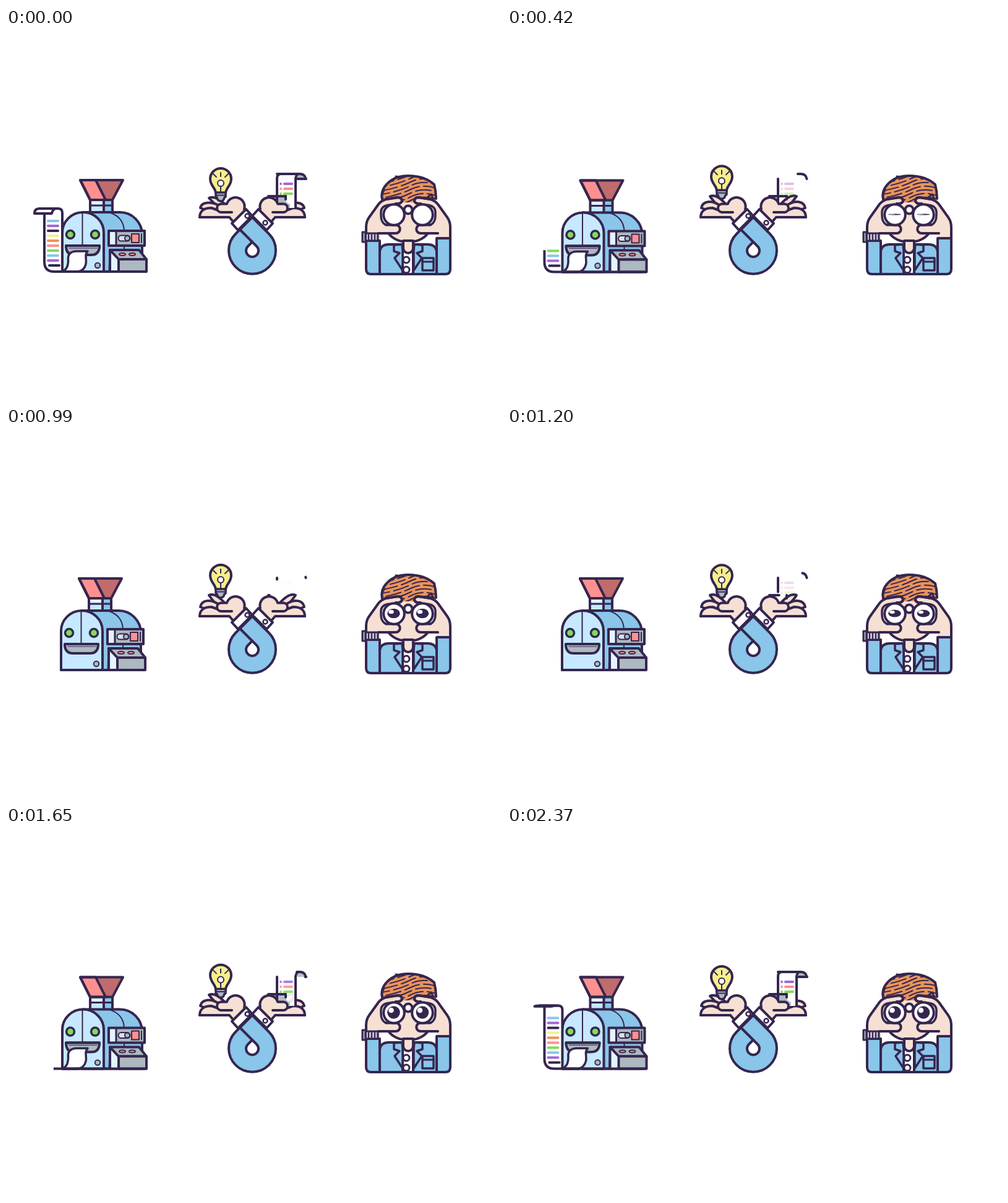
These frames come from a looping animation (800 px wide and 600 px high, 2400 ms). An HTML page with a canvas:

```html
<!DOCTYPE html>
<html lang="en">
<head>
<meta charset="utf-8">
<title>Three icons</title>
<style>
html, body { margin: 0; width: 800px; height: 600px; overflow: hidden; background: #fff; }
canvas { display: block; }
</style>
</head>
<body>
<canvas id="stage" width="800" height="600"></canvas>
<script>
const ctx = document.getElementById('stage').getContext('2d');
const LOOP = 2400;
const INK = '#35264f', WHITE = '#fff', PALE = '#c6e9ff', ICE = '#e3f4ff', BLUE = '#8ac5ea',
  SKIN = '#f6e0d3', PINK = '#ff9090', RED = '#c06c6c', YELLOW = '#f7ef8c', GREY = '#adb9c1',
  GREEN = '#7fdc5a', PURPLE = '#a566d8', ORANGE = '#e8935c';

// Linear value at time t through [time, value] points
function track(t, points) {
  for (let i = 1; i < points.length; i++) {
    const [t0, a] = points[i - 1], [t1, b] = points[i];
    if (t <= t1) return a + (b - a) * Math.max(0, (t - t0) / (t1 - t0));
  }
  return points[points.length - 1][1];
}

function shape(d, fill, width = 4, color = INK) {
  const path = new Path2D(d);
  if (fill) { ctx.fillStyle = fill; ctx.fill(path); }
  if (width) { ctx.strokeStyle = color; ctx.lineWidth = width; ctx.stroke(path); }
}
const line = (d, width = 4, color = INK) => shape(d, null, width, color);

function oval(x, y, rx, ry, fill, width = 0) {
  ctx.beginPath();
  ctx.ellipse(x, y, rx, ry, 0, 0, Math.PI * 2);
  ctx.fillStyle = fill;
  ctx.fill();
  if (width) { ctx.strokeStyle = INK; ctx.lineWidth = width; ctx.stroke(); }
}
const disc = (x, y, r, fill, width) => oval(x, y, r, r, fill, width);

function scoped(draw) { ctx.save(); draw(); ctx.restore(); }

function clipped(x, y, w, h, draw) {
  scoped(() => { ctx.beginPath(); ctx.rect(x, y, w, h); ctx.clip(); draw(); });
}

// Draws once as is and once reflected; the axis is at sum / 2
function mirrored(sum, draw) {
  draw();
  scoped(() => { ctx.translate(sum, 0); ctx.scale(-1, 1); draw(); });
}

// ---- Printing machine ----
function machineBody() {
  shape('M136 278H172V300H136Z', BLUE, 0);
  shape('M136 278H157V300H136Z', ICE, 0);
  shape('M138 288H157V298H138Z', PALE, 0);
  line('M136 278V298M172 278V298M158 278V298');
  line('M136 287H172', 3);
  shape('M120 246H189L172 278H136Z', RED, 0);
  shape('M120 246H145L161 278H136Z', PINK);
  line('M120 246H189L172 278H136Z');

  shape('M124 298H184A36 36 0 0 1 220 334V394H124Z', BLUE);
  line('M166 298Q190 305 191 328V360', 2);
  shape('M91 394V331A33.5 33 0 0 1 158 331V394Z', PALE);
  line('M123.5 299V352', 2);
  disc(104, 334, 6.5, GREEN, 3.5);
  disc(144, 334, 6.5, GREEN, 3.5);
  disc(148, 384, 4.2, GREY, 2);

  shape('M166 328H224V352H166Z', GREY, 0);
  shape('M166 328H178V352H166Z', ICE, 3);
  line('M166 328H224V352H166Z');
  shape('M186 335.5H196A4.5 4.5 0 0 1 196 344.5H186A4.5 4.5 0 0 1 186 335.5Z', '#d9e2e8', 2);
  disc(196, 340, 4, GREY, 2);
  shape('M203 333H215V347H203Z', PINK, 2);
  line('M219 333V347', 2);

  shape('M168 359L182 374V394H167Z', ICE, 3);
  shape('M168 359H215L227 374H182Z', GREY);
  shape('M182 374H227V394H182Z', GREY);
  line('M168 359V394');
  oval(188, 366, 5, 2, PINK, 2);
  oval(204, 366, 5, 2, PINK, 2);
}

function mouthAndTongue(length) {
  shape('M97 352H151V354Q150 367 138 367H110Q98 367 97 354Z', GREY);
  line('M102 356H147', 1);
  if (length <= 0) return;
  clipped(85, 350, 75, length + 2, () => {
    shape('M132 361C126 367 131 374 129 382Q126 393 116 394H91Q99 390 100 382C102 375 98 370 103 365Q107 361 114 361Z', WHITE, 3.5);
  });
  line('M97 352H151');
}

const RULES = [BLUE, PURPLE, INK, YELLOW, ORANGE, PINK, GREEN, BLUE, PURPLE, INK];

function paperStrip(length) {
  if (length <= 45) return;
  scoped(() => {
    ctx.lineCap = 'butt';
    ctx.setLineDash([length - 19, 999]);
    line('M118 394H78Q62 394 62 378V292');
  });
  if (length <= 84) return;
  const top = 462 - length;
  clipped(40, top - 3, 60, 110, () => line('M82 292H84Q91 292 91 299V328'));
  RULES.forEach((color, i) => {
    const y = 312 + i * 8;
    if (y > top) line(i === 9 ? `M70 ${y}H86` : `M68 ${y}H84`, 4, color);
  });
  const curl = Math.min(1, (length - 170) / 12);
  if (curl <= 0) return;
  line('M54 292H84');
  const low = 292 + 8 * curl;
  shape(`M80 292Q75 ${292 + 2 * curl} 74 ${low}H46Q46 292 54 292Z`, WHITE);
}

function machine(t) {
  const length = track(t, [[0, 182], [420, 104], [900, 0], [1230, 0], [1380, 23],
    [1650, 60], [2010, 124], [2370, 172], [2400, 182]]);
  const dx = track(t, [[0, 0], [420, -1.5], [990, -2], [1380, -2], [1650, 0], [2010, -2], [2370, -1.5], [2400, 0]]);
  const dy = track(t, [[0, 0], [420, 0.5], [990, -1], [1380, -0.8], [1650, -1.4], [2010, -1], [2370, -1.6], [2400, 0]]);
  scoped(() => {
    ctx.translate(dx, dy);
    machineBody();
    mouthAndTongue(length);
    paperStrip(length);
    line('M91 394H226');
  });
}

// ---- Balancing hands ----
function fingers(lift) {
  const y = 3 * (1 - lift);
  shape(`M328 ${272 + y}C336 ${268 + y} 345 ${275 + y / 2} 354 285L345 290Q336 284 328 ${272 + y}Z`, SKIN);
  shape(`M314 291C316 ${280 + y / 2} 330 ${277 + y} 344 287L346 297H330Z`, SKIN);
  shape('M313 306C313 296 320 291 332 291L346 296L365 306Z', SKIN);
}

function palm() {
  shape('M345 296L348 284H357A14 14 0 0 1 385 293L367 313L361 306H330Z', SKIN, 0);
  shape('M365 298H347A6.8 6.8 0 0 1 347 284.5H357A14 14 0 0 1 385 293', SKIN);
  line('M313 306H361L367 313');
}

function bulb(dy) {
  scoped(() => {
    ctx.translate(0, dy);
    shape('M339 267C339 259 330 255 330 244A17 17 0 1 1 364 244C364 255 355 259 355 267Z', YELLOW);
    shape('M339 266H355V272Q355 274 353 274Q352 280 347 280Q342 280 341 274Q339 274 339 272Z', GREY, 3.5);
    line('M340 270.5H354', 2);
    line('M347 255V265M347 234V240M335 236L340 241M359 236L354 241', 2);
    disc(347, 251, 5, WHITE, 2);
  });
}

// age: 0 for a whole sheet, 900 for a vanished one
function listSheet(age) {
  const fade = track(age, [[0, 1], [150, 0.85], [420, 0.4], [810, 0.03], [900, 0]]);
  const solid = track(age, [[0, 1], [150, 0.9], [420, 0], [900, 0]]);
  const cut = track(age, [[0, 0], [150, 1]]);
  const shrink = track(age, [[420, 1], [810, 0.06], [900, 0]]);
  const side = track(age, [[150, 1], [420, 0]]);
  const fold = track(age, [[0, 1], [150, 0.1], [300, 0]]);
  scoped(() => {
    ctx.globalAlpha = solid;
    shape('M438 243Q438 236 445 236H472Q468 238 468 245V291H438Z', WHITE, 0);
    shape('M470 236H478Q485 237 485 244H471Z', GREY, 0);
    shape('M424 272H452V278Q454 284 459 285V290H424Z', GREY, 0);
    ctx.globalAlpha = fade;
    [PURPLE, PINK, GREEN].forEach((color, i) => {
      const y = 252 + i * 8;
      disc(444, y, 2, color);
      line(`M450 ${y}H462`, 4, color);
    });
  });
  if (cut < 1) line(`M${438 + 28 * cut} 236H470M438 243Q438 ${236 + 6 * cut} ${445 - 7 * cut} ${236 + 6 * cut}`);
  if (fold > 0) line(`M${485 - 14 * fold} 244H485`);
  if (side > 0) {
    line(`M468 ${291 - 47 * side}V291`);
    line('M468 245Q468 239 472 236', 4 * side);
  }
  if (shrink > 0) {
    line(`M438 244V${244 + 40 * shrink}`);
    line(`M424 272H${424 + 28 * shrink}`);
    if (shrink > 0.5) line('M452 272V277');
    scoped(() => {
      ctx.setLineDash([20 * shrink, 99]);
      line('M484.5 244Q483 236 475 236H470');
    });
  }
}

function hands(t) {
  const age = t < 900 ? t : Math.max(0, 1800 - t);
  const lift = track(age, [[0, 0], [150, 0.65], [420, 0.93], [810, 1]]);
  mirrored(796, () => fingers(lift));
  bulb(-4 * lift);
  listSheet(age);
  mirrored(796, palm);
  shape('M398 306L425 333A38 38 0 1 1 371 333Z', BLUE);
  line('M378 326L398 346');
  shape('M398 346L405 353A10 10 0 1 1 391 353Z', WHITE);
  mirrored(796, () => shape('M365 316L388 293L398 304L375 327Z', WHITE));
  disc(390, 304, 3.5, WHITE, 2.5);
  disc(419, 315, 3.5, WHITE, 2.5);
}

// ---- Watcher with binoculars ----
function hair() {
  const outline = 'M608 280C604 258 622 239 650 239C670 239 684 246 692 253Q695 264 695 279L690 284H612Z';
  shape(outline, ORANGE, 0);
  scoped(() => {
    ctx.clip(new Path2D(outline));
    ctx.setLineDash([25, 7]);
    for (let i = 0; i < 10; i++) {
      const y = 232 + i * 6;
      ctx.lineDashOffset = i * 13;
      line(`M602 ${y + 20}Q634 ${y + 15} 654 ${y + 5}T698 ${y + 4}`, 2);
    }
  });
  line('M608 277C604 258 622 239 650 239C670 239 684 246 692 253Q695 264 695 276');
  line('M630 240L640 241M607 271L611 262M681 274L687 269L690 275', 3);
}

function jacket() {
  shape('M604 398V362Q605 350 619 350H681Q695 350 696 362V398Z', BLUE);
  shape('M637 350H663L657 398H641Z', WHITE, 0);
  line('M641 360V398M658 360V398');
  mirrored(1300, () => shape('M640 350L627 351V361L636 364L628 372L641 392V360Z', BLUE, 3.5));
  shape('M642 344H658V356A8 8 0 0 1 642 356Z', SKIN);
  disc(647, 375, 5, WHITE, 3);
  disc(647, 391, 5, WHITE, 3);
  shape('M673 372H691V392H673Z', BLUE, 3.5);
  line('M673 378H691', 3);
}

function gripHand() {
  shape('M582 346V322Q582 313 587 306L602 285Q607 279 614 277L633 274Q640 274 640 280'
    + 'Q639 284 632 284C615 284 606 292 606 302Q606 318 618 319H630A6.5 6.5 0 0 1 630 332H604V346Z', SKIN, 0);
  line('M582 346V322Q582 313 587 306L602 285Q607 279 614 277L633 274Q640 274 640 280');
  line('M640 280Q638 285 630 284');
  line('M614 318.5H630A6.7 6.7 0 0 1 630 332H602');
}

function lens() {
  shape('M620 286H634L640 292V312L634 318H613Q606 314 606 303V297Q607 287 620 286Z', WHITE, 3.5);
  disc(627, 302, 16.8, WHITE, 4);
}

function pupil(x, open) {
  if (open <= 0) return;
  scoped(() => {
    ctx.translate(x, 301.5);
    ctx.scale(1, open);
    disc(0, 0, 10.3, INK);
    disc(-4, -3.5, 4.3, WHITE);
  });
}

function watcher(t) {
  const open = track(t, [[0, 0], [420, 0.1], [990, 0.75], [1380, 0.42], [1650, 1]]);
  hair();
  shape('M612 282H688V325Q680 346 650 346Q620 346 612 325Z', SKIN, 0);
  line('M618 332Q629 346 650 346Q671 346 682 332');
  jacket();
  mirrored(1300, () => {
    gripHand();
    lens();
    line('M614 277L633 274Q640 274 640 280Q638 285 630 284');
  });
  shape('M582 344H604V398H590Q582 398 582 390Z', BLUE);
  shape('M696 340H718V390Q718 398 710 398H696Z', BLUE);
  shape('M581 332H601V344H581Z', '#c5c0d2', 3);
  line('M586 333V343M591 333V343M596 333V343', 2);
  shape('M576 330H581V346H576Z', GREY, 3);
  line('M590 398H710');
  disc(650, 294, 6.5, WHITE, 4);
  pupil(626.5, open);
  pupil(673, open);
}

function render(now) {
  const t = now % LOOP;
  ctx.fillStyle = WHITE;
  ctx.fillRect(0, 0, 800, 600);
  ctx.lineCap = ctx.lineJoin = 'round';
  machine(t);
  hands(t);
  watcher(t);
}

let start;
function tick(now) {
  start ??= now;
  render(now - start);
  requestAnimationFrame(tick);
}
render(0);
requestAnimationFrame(tick);
</script>
</body>
</html>
```
